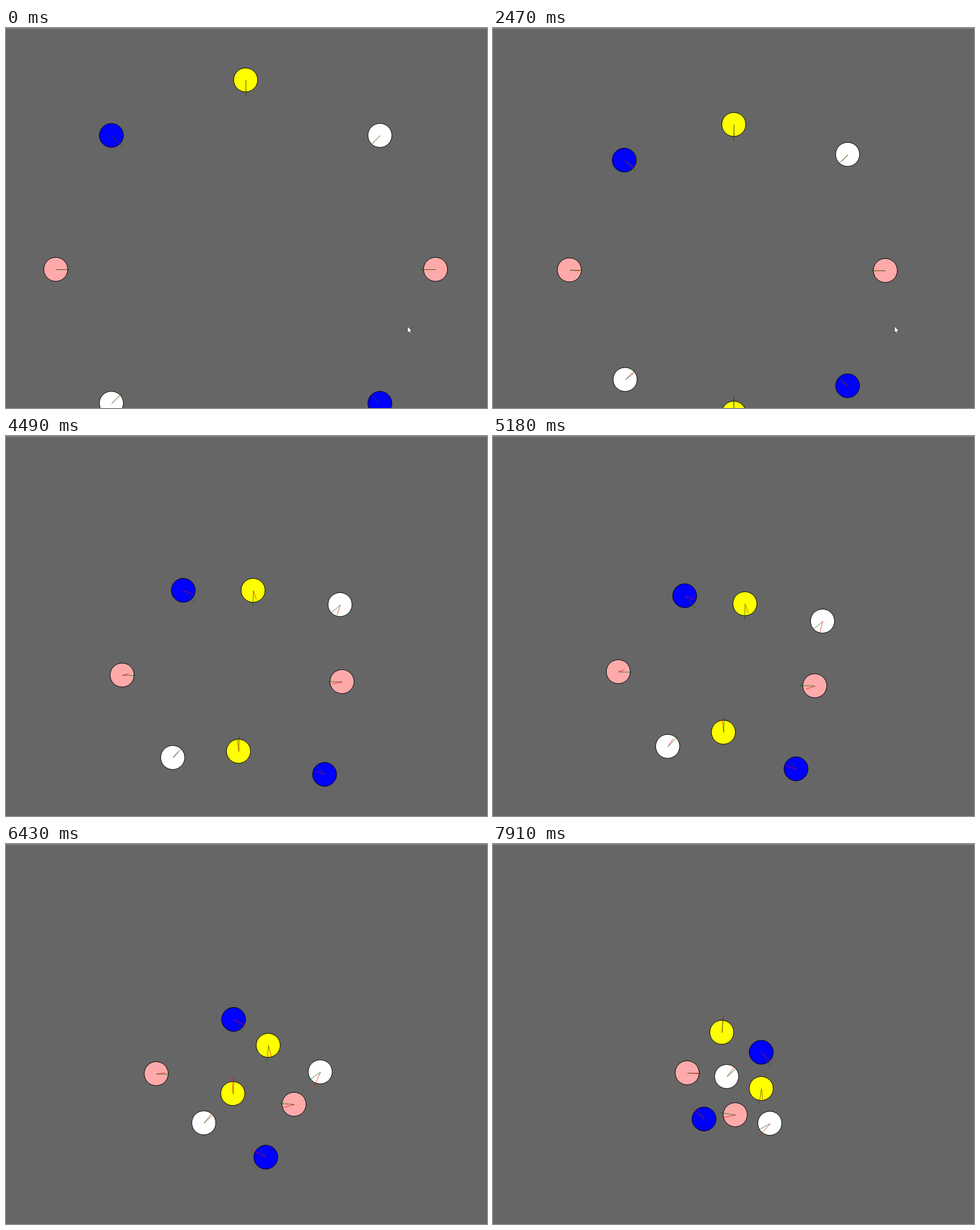
An HTML page with a canvas for the animation above (8000 ms loop, 841x666 px).

```html
<!DOCTYPE html>
<html lang="en">
<head>
<meta charset="utf-8">
<title>Crossing agents</title>
<style>
  html, body { margin: 0; width: 100%; height: 100%; overflow: hidden; background: #666; }
  canvas { display: block; }
</style>
</head>
<body>
<canvas id="stage" width="841" height="666"></canvas>
<script>
const ctx = document.getElementById('stage').getContext('2d');

const LOOP = 8000, START = 1385, STEP = 77.5;
const CLICK = 1220, CURSOR_END = 2790;
const CENTER = { x: 419, y: 423 }, RING = 332, RADIUS = 21;
const VELOCITY_SCALE = 5.2;
const KEYS = [0, 15, 25, 41, 58, 73, 85];

const YELLOW = '#ff0', WHITE = '#fff', PINK = '#faa', BLUE = '#00f';

// angle on the ring, fill, preferred speed, waypoints after the start
const agents = [
  [0, PINK, 27, [[686, 425], [641.5, 424], [587.5, 430.5], [533.5, 447.5], [475.5, 463.5], [423.5, 474.5]]],
  [45, BLUE, 23, [[620, 627], [592.5, 610], [557, 593], [493, 568.5], [420, 527.5], [369, 482]]],
  [90, YELLOW, 28, [[421, 675], [416, 615.5], [406.5, 552.5], [399.5, 478.5], [395.5, 399], [400, 330]]],
  [135, WHITE, 25, [[231, 616], [266, 590.5], [291.5, 563.5], [324, 517], [367.5, 461], [408.5, 407.5]]],
  [180, PINK, 23, [[133.5, 424], [169, 426.5], [203, 419], [239.5, 406.5], [287, 400.5], [339.5, 401]]],
  [225, BLUE, 28, [[229.5, 231.5], [264.5, 254], [310, 270.5], [366, 293], [426, 324], [469, 365]]],
  [270, YELLOW, 28, [[421, 169], [417.5, 227.5], [432, 270.5], [450, 323], [464.5, 380.5], [469, 428.5]]],
  [315, WHITE, 23, [[620, 221.5], [600, 245], [584, 295.5], [564.5, 361], [531, 434], [484, 489.5]]]
].map(([deg, fill, speed, points]) => {
  const a = deg * Math.PI / 180;
  const dx = RING * Math.cos(a), dy = RING * Math.sin(a);
  const path = [[CENTER.x + dx, CENTER.y + dy], ...points];
  return {
    fill, speed,
    goal: [CENTER.x - dx, CENTER.y - dy],
    x: curve(path.map(p => p[0])),
    y: curve(path.map(p => p[1]))
  };
});

// Smooth curve through the values at KEYS; returns [value, slope]
function curve(v) {
  const slope = v.slice(1).map((b, i) => (b - v[i]) / (KEYS[i + 1] - KEYS[i]));
  const last = slope.length - 1;
  const tangent = v.map((_, i) => {
    if (i === 0) return slope[0];
    if (i > last) return slope[last];
    const before = KEYS[i] - KEYS[i - 1], after = KEYS[i + 1] - KEYS[i];
    return (slope[i - 1] * after + slope[i] * before) / (before + after);
  });
  return n => {
    let i = 0;
    while (i < last && n >= KEYS[i + 1]) i++;
    const h = KEYS[i + 1] - KEYS[i], u = (n - KEYS[i]) / h;
    const m0 = tangent[i] * h, m1 = tangent[i + 1] * h, d = v[i + 1] - v[i];
    const c2 = 3 * d - 2 * m0 - m1, c3 = m0 + m1 - 2 * d;
    return [
      v[i] + u * (m0 + u * (c2 + u * c3)),
      (m0 + u * (2 * c2 + 3 * u * c3)) / h
    ];
  };
}

function disc(x, y, r, fill) {
  ctx.beginPath();
  ctx.arc(x, y, r, 0, 2 * Math.PI);
  ctx.fillStyle = fill;
  ctx.fill();
  ctx.strokeStyle = '#000';
  ctx.lineWidth = 1;
  ctx.stroke();
}

function ray(x, y, dx, dy, color) {
  ctx.beginPath();
  ctx.moveTo(x + .5, y + .5);
  ctx.lineTo(x + dx + .5, y + dy + .5);
  ctx.strokeStyle = color;
  ctx.stroke();
}

function drawAgent(agent, n) {
  const [x, vx] = agent.x(n), [y, vy] = agent.y(n);
  const gx = agent.goal[0] - x, gy = agent.goal[1] - y;
  const k = agent.speed / Math.hypot(gx, gy);
  const wish = [gx * k, gy * k];
  const actual = n ? [vx * VELOCITY_SCALE, vy * VELOCITY_SCALE] : wish;
  disc(x, y, RADIUS, agent.fill);
  ray(x, y, ...actual, 'rgba(255,0,0,.75)');
  ray(x, y, ...wish, 'rgba(0,100,0,.75)');
}

function drawCursor() {
  const arrow = new Path2D('M702 522.5V534.5L704.7 532L706.6 536.3L708.4 535.5L706.5 531.3H710Z');
  ctx.fillStyle = '#fff';
  ctx.fill(arrow);
  ctx.strokeStyle = '#222';
  ctx.lineWidth = .8;
  ctx.stroke(arrow);
}

function draw(t) {
  const n = t < START ? 0 : Math.min(85, Math.floor((t - START) / STEP) + 1);
  ctx.fillStyle = '#666';
  ctx.fillRect(0, 0, 841, 666);
  ctx.fillStyle = '#999';
  ctx.fillRect(0, 0, 841, 1);
  agents.forEach(agent => drawAgent(agent, n));
  if (t >= CLICK && t < START) disc(702, 523, 9.5, 'rgba(255,255,255,.5)');
  if (t < CURSOR_END) drawCursor();
}

function tick() {
  draw(performance.now() % LOOP);
  requestAnimationFrame(tick);
}
tick();
</script>
</body>
</html>
```
